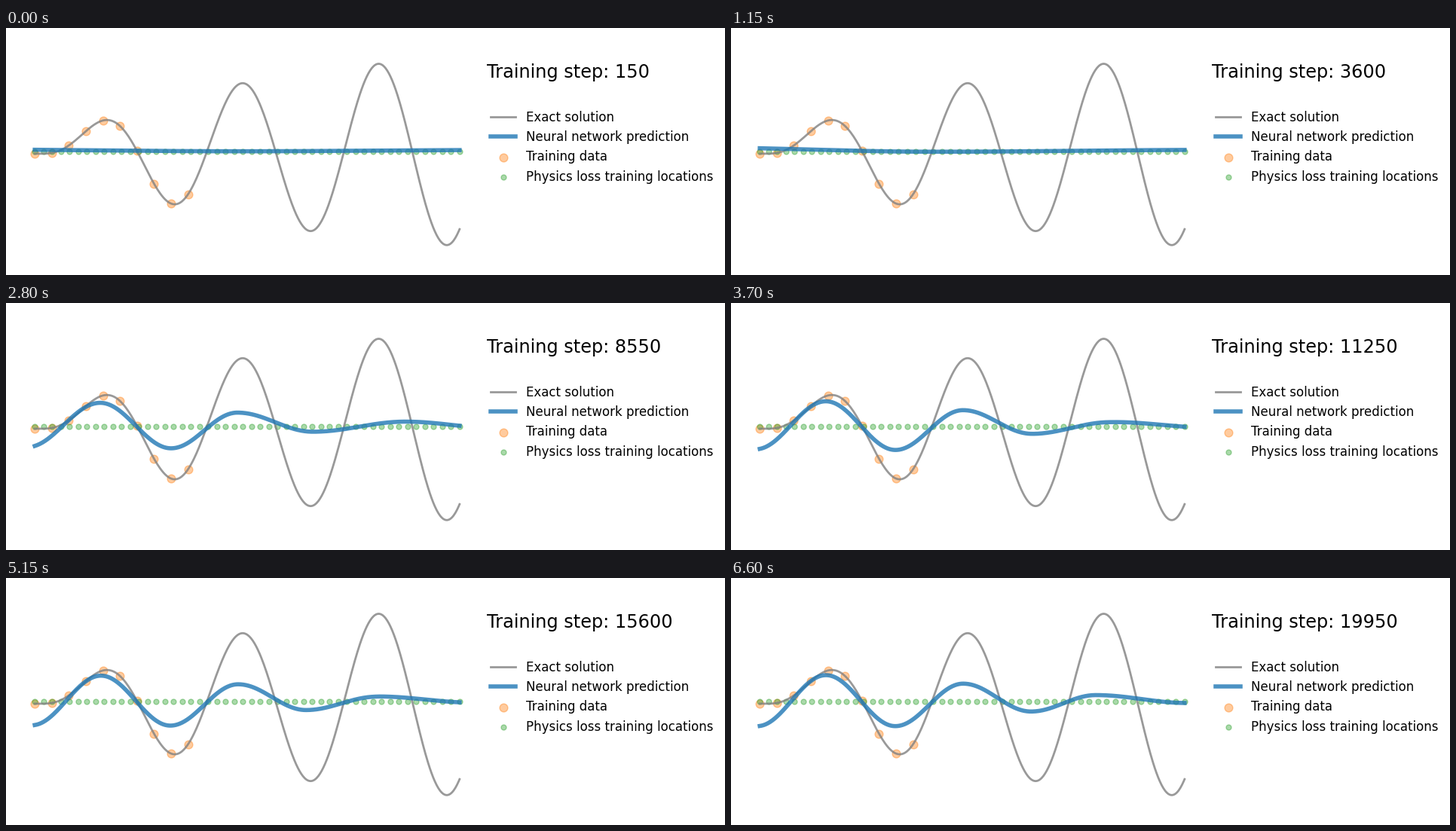
Animation of 954 by 328 pixels, one loop 6.65 s. Source, as a matplotlib script:

```python
import numpy as np
import matplotlib.pyplot as plt
from matplotlib.animation import FuncAnimation

W, H, DPI = 954, 328, 100
FRAMES, INTERVAL, STEP = 133, 50, 150

plt.rcParams["font.family"] = "DejaVu Sans"


def exact(t):
    """Driven, damped oscillator starting at rest."""
    d, wd, w = 2, 19.9, 19.5
    b, c = 1.026, 1.005
    transient = c * np.cos(wd * t) + c * d / wd * np.sin(wd * t)
    return np.exp(-d * t) * transient - b * np.cos(w * t)


def wave(*turns):
    """Half-cosine arcs through turning points given in stage pixels."""
    px, py = np.array(turns, float).T
    tx, ty = (px - 38.18) / 563.64, (164 - py) / 140
    k = np.clip(np.searchsorted(tx, t, side="right") - 1, 0, len(tx) - 2)
    s = (t - tx[k]) / (tx[k + 1] - tx[k])
    return ty[k] + (ty[k + 1] - ty[k]) * (1 - np.cos(np.pi * s)) / 2


t = np.linspace(0, 1, 500)

# (frame, rate of the approach to this stage, predicted curve)
STAGES = [
    (0, 0, wave((-60, 161.3), (310, 163.7), (660, 162))),
    (23, 0.1, wave((-60, 158.5), (270, 164.3), (650, 161.8))),
    (39, -1.6, wave((12, 182), (121, 143.5), (219, 184.5), (315, 155),
                    (455, 165), (700, 159))),
    (57, 3.6, wave((28, 191.5), (125, 132.5), (219, 193), (307, 145.5),
                   (407, 171), (530, 157.5), (650, 166))),
    (93, 3, wave((34, 195), (126, 130), (218, 195.7), (308, 141.5),
                 (398, 174.5), (500, 158), (630, 165.5))),
    (132, 0.5, wave((35, 196.7), (126, 129), (218, 196.7), (308, 140.3),
                    (398, 177.3), (484, 155.5), (605, 166))),
]


def prediction(i):
    for (a, _, ya), (b, r, yb) in zip(STAGES, STAGES[1:]):
        if i <= b:
            k = np.expm1(-r * (i - a) / (b - a)) / np.expm1(-r)
            return ya + k * (yb - ya)


# The small margin keeps the pixel size from rounding down.
fig = plt.figure(figsize=((W + 0.01) / DPI, (H + 0.01) / DPI), dpi=DPI,
                 facecolor="white")
ax = fig.add_axes([10 / W, 10 / H, 620 / W, 308 / H])
ax.set(xlim=(-0.05, 1.05), ylim=(-1.1, 1.1))
ax.axis("off")

ax.plot(t, exact(t), color="grey", lw=2, alpha=0.8, label="Exact solution")
line, = ax.plot(t, prediction(0), color="tab:blue", lw=4, alpha=0.8,
                label="Neural network prediction")
data = t[:200:20]
ax.scatter(data, exact(data), s=60, color="tab:orange", alpha=0.4,
           label="Training data")
spots = np.linspace(0, 1, 50)
ax.scatter(spots, 0 * spots, s=25, color="tab:green", alpha=0.4,
           label="Physics loss training locations")
ax.legend(loc=(1.01, 0.34), frameon=False, fontsize="large")
title = ax.text(1.065, 0.7, "", fontsize="xx-large", color="k")


def update(i):
    line.set_ydata(prediction(i))
    title.set_text(f"Training step: {STEP * (i + 1)}")
    return line, title


anim = FuncAnimation(fig, update, frames=FRAMES, interval=INTERVAL,
                     repeat=True, repeat_delay=0)
plt.show()
```
